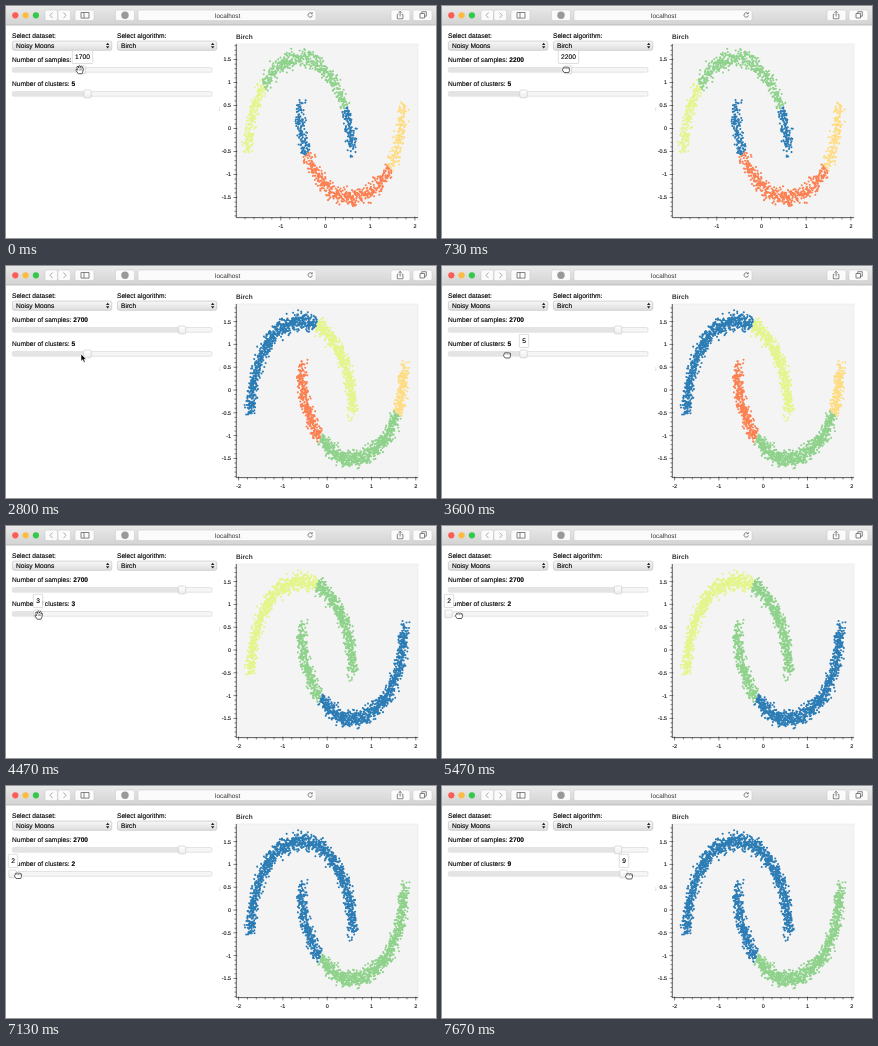
These frames come from a looping animation (430 px wide and 232 px high, 8000 ms). An HTML page:

```html
<!DOCTYPE html>
<html lang="en">
<head>
<meta charset="utf-8">
<title>Clustering demo</title>
<style>
  html, body { margin: 0; width: 100%; height: 100%; overflow: hidden; background: #fff; }
  svg { display: block; width: 430px; height: 232px; }
  text { font: 6.65px "Liberation Sans", Arial, sans-serif; fill: #000; stroke: #000; stroke-width: .12; text-rendering: geometricPrecision; white-space: pre; }
  .bold { font-weight: bold; }
  .tick { font-size: 5.4px; fill: #222; }
  .mid { text-anchor: middle; }
  .end { text-anchor: end; }
  .dots path { fill: none; stroke-width: 2.1; stroke-linecap: round; }
  .icon { fill: none; stroke: #666; stroke-width: .8; }
</style>
</head>
<body>
<svg viewBox="0 0 430 232">
  <defs>
    <linearGradient id="bar" x2="0" y2="1"><stop stop-color="#e9e9e9"/><stop offset="1" stop-color="#d3d3d3"/></linearGradient>
    <linearGradient id="knob" x2="0" y2="1"><stop stop-color="#fff"/><stop offset="1" stop-color="#ededed"/></linearGradient>
    <linearGradient id="menu" x2="0" y2="1"><stop stop-color="#f8f8f8"/><stop offset="1" stop-color="#dedede"/></linearGradient>
  </defs>
  <rect width="430" height="232" fill="#fff"/>
  <rect width="430" height="19" fill="url(#bar)"/>
  <rect y="18.6" width="430" height=".8" fill="#b4b4b4"/>
  <circle cx="9.3" cy="9.3" r="3.1" fill="#fc5b57"/>
  <circle cx="19.6" cy="9.3" r="3.1" fill="#fdbc40"/>
  <circle cx="29.9" cy="9.3" r="3.1" fill="#34c84a"/>
  <g id="buttons" fill="#fbfbfb" stroke="#c6c6c6" stroke-width=".5"></g>
  <path class="icon" d="M46.5 6.5l-2.5 2.8 2.5 2.8M57.5 6.5l2.5 2.8-2.5 2.8" style="stroke:#999"/>
  <path class="icon" d="M75 6.5h8v5.6h-8zM78 6.5v5.6"/>
  <circle cx="119" cy="9.3" r="3.7" fill="#999"/>
  <path class="icon" d="M305.9 7.5a2.2 2.2 0 1 0 .5 1.9M306.3 6.3v1.5h-1.5"/>
  <path class="icon" d="M392.5 8.3h-1.2v4.500h5.600v-4.500h-1.200M394.100 10.500v-5.200m-1.500 1.500l1.500-1.500 1.500 1.500"/>
  <path class="icon" d="M414 7.500h4.500v4.500h-4.500zM415.800 7.500v-1.800h4.500v4.500h-1.800"/>
  <text class="mid" x="221.700" y="11.600" style="font-size:6.400px;fill:#333;stroke:none">localhost</text>
  <g id="selects"></g>
  <g id="sliders"></g>
  <path d="M213.700 101.500v3.500" stroke="#bbb" stroke-width=".7" stroke-dasharray=".8 .6"/>
  <rect x="230" y="38" width="182" height="174" fill="#f4f4f4" stroke="#e4e4e4" stroke-width=".5"/>
  <path d="M230.300 38v173.600h181.700" fill="none" stroke="#222" stroke-width=".7"/>
  <text class="bold" x="230" y="33.300" style="font-size:6.500px;fill:#333;stroke:none">Birch</text>
  <g id="scenes"></g>
  <g id="tips"></g>
  <g id="cursor" stroke-linejoin="round">
    <path id="arrow" d="M0 0v7.200l1.700-1.500 1.200 2.700 1.300-.6-1.200-2.600h2.300z" fill="#000" stroke="#fff" stroke-width=".6"/>
    <g id="open" fill="#fff" stroke="#222" stroke-width=".7">
      <path d="M-1.800 4.200l-2.100-3.200q-.6-1.300.9-.9l.6.500-.9-2.900q.1-1.300 1.300-.5l.6 1.300v-2q.7-1.200 1.400 0l.2 1.700.6-1.500q1-.8 1.300.3l-.2 1.700q1.400-1.400 1.700.2l-.9 3.700-.6 1.600z"/>
      <path d="M-.8-.9l.1 2M.7-1l-.1 2M2-.7l-.3 1.700" fill="none" stroke-width=".45"/>
    </g>
    <g id="closed" fill="#fff" stroke="#222" stroke-width=".7">
      <path d="M-1.900 3l-1.500-2.200q-.5-1.200.7-1.400v-1.300q.7-1 1.600-.2.800-.8 1.700 0 .9-.6 1.500.2 1.400-.4 1.500.9l-.2 2.200-.7 1.800z"/>
      <path d="M-1-1.600v1.200M.7-1.600v1.200M2.200-1.500v1.200" fill="none" stroke-width=".5"/>
    </g>
  </g>
</svg>
<script>
const $ = id => document.getElementById(id);
const rect = (x, y, w, h, r = 1, extra = '') => `<rect x="${x}" y="${y}" width="${w}" height="${h}" rx="${r}" ${extra}/>`;
const text = (x, y, str, cls = '') => `<text x="${x}" y="${y}" class="${cls}">${str}</text>`;

// Browser buttons and form controls
$('buttons').innerHTML = [[39, 12.5], [52, 12.5], [69, 19], [109.5, 19], [132, 178], [385, 19], [407, 19]]
  .map(([x, w]) => rect(x, 4, w, 10.6, 1.8)).join('');

$('selects').innerHTML = [[6, 'Select dataset:', 'Noisy Moons'], [111, 'Select algorithm:', 'Birch']]
  .map(([x, label, value]) => text(x, 32, label) +
    rect(x + .4, 35.1, 99.4, 9.2, 2, 'fill="url(#menu)" stroke="#bdbdbd" stroke-width=".6"') +
    text(x + 4, 42, value) +
    `<path d="M${x + 94} 39l1.700-2.300 1.700 2.300zM${x + 94} 40.300l1.700 2.300 1.700-2.300z" fill="#222"/>`).join('');

const sliders = [['samples', 64, 21], ['clusters', 88, 10]].map(([name, y, tipWidth]) => {
  $('sliders').innerHTML += `<text x="6" y="${y - 8}">Number of ${name}: <tspan class="bold" id="${name}"></tspan></text>` +
    rect(6.3, y - 2.4, 199.6, 4.6, 1.2, 'fill="#f6f6f6" stroke="#d2d2d2" stroke-width=".6"') +
    rect(6.6, y - 2.1, 0, 4, 1, `id="${name}Fill" fill="#e4e4e4"`) +
    rect(-3.7, y - 4, 7.4, 7.8, 1.3, `id="${name}Knob" fill="url(#knob)" stroke="#c4c4c4" stroke-width=".6"`);
  $('tips').innerHTML += `<g id="${name}Tip">` +
    rect(-tipWidth / 2 + .8, y - 19.7, tipWidth - .6, 13.2, .8, 'fill="#fff" stroke="#c8c8c8" stroke-width=".6"') +
    text(.5, y - 11, '', 'mid') + '</g>';
  return (value, x, tipShown) => {
    $(name).textContent = value;
    $(name + 'Fill').setAttribute('width', Math.max(0, x - 6.6));
    $(name + 'Knob').setAttribute('transform', `translate(${x})`);
    const tip = $(name + 'Tip');
    tip.setAttribute('transform', `translate(${x})`);
    tip.style.display = tipShown ? '' : 'none';
    tip.lastChild.textContent = value;
  };
});

// Scatter plots: each moon is cut into clusters by the angle along its arc
const blue = '#2c7cb5', green = '#8fd28b', lime = '#e3f58b', yellow = '#fedc82', orange = '#fb8153';
const small = { n: 1700, x0: 319.5, y0: 122.5, sx: 44.7, sy: 46 };
const large = { n: 2700, x0: 321.2, y0: 124, sx: 44.3, sy: 45.6 };
const scenes = [
  { ...small, moons: [[[46, lime], [152, green], [181, blue]], [[31, blue], [138, orange], [181, yellow]]] },
  { ...large, moons: [[[107, blue], [181, lime]], [[51, orange], [150, green], [181, yellow]]] },
  { ...large, moons: [[[107, lime], [181, green]], [[51, green], [181, blue]]] },
  { ...large, moons: [[[181, blue]], [[51, blue], [181, green]]] }
];

function drawDots({ n, x0, y0, sx, sy, moons }) {
  let seed = 7;
  const random = () => (seed = seed * 16807 % 2147483647) / 2147483647;
  const noise = () => .092 * (random() + random() + random() - 1.5);
  const paths = {};
  for (let i = 0; i < n; i++) {
    const inner = i % 2, a = Math.PI * i / n;
    const c = Math.cos(a) + noise(), s = Math.sin(a) + noise();
    const x = inner ? 1 - c : -c, y = inner ? .5 - s : s;
    const angle = Math.atan2(Math.max(s, 0), c) * 180 / Math.PI;
    const color = moons[inner].find(([limit]) => angle < limit)[1];
    const px = x0 + sx * (x - .5) / .866, py = y0 - sy * (y - .25) / .495;
    paths[color] = (paths[color] || '') + `M${px.toFixed(2)} ${py.toFixed(2)}h0`;
  }
  return '<g class="dots">' + Object.entries(paths).map(([c, d]) => `<path stroke="${c}" d="${d}"/>`).join('') + '</g>';
}

function drawAxes({ x0, y0, sx, sy }) {
  let ticks = '', labels = '';
  for (let i = -19; i <= 18; i++) {
    const y = y0 - i * sy / 10, major = i % 5 === 0;
    ticks += major ? `M227.5 ${y}h3.8` : `M228.5 ${y}h1.8`;
    if (major) labels += text(225, y + 1.9, i / 10, 'tick end');
  }
  for (let i = -10; i <= 10; i++) {
    const x = x0 + i * sx / 5, major = i % 5 === 0;
    if (x < 230.5) continue;
    ticks += major ? `M${x} 210.6v3.8` : `M${x} 211.6v1.8`;
    if (major) labels += text(x, 222, i / 5, 'tick mid');
  }
  return `<path d="${ticks}" stroke="#222" stroke-width=".6"/>` + labels;
}

$('scenes').innerHTML = scenes.map(s => `<g>${drawDots(s)}${drawAxes(s)}</g>`).join('');

// Timeline in steps of 1/15 s: [step, x, y] for the pointer, [step, value] for the rest
const pointer = [[0, 74, 63.5], [5, 74, 63.5], [17, 174, 63.5], [21, 174, 63.5], [22, 172, 62], [34, 172, 62],
  [38, 47, 97], [40, 47, 97], [42, 75, 88], [43, 80, 89], [47, 80, 89], [54, 65, 89], [58, 33, 89],
  [76, 33, 89], [82, 17, 89.5], [85, 17, 89.5], [86, 18, 88], [99, 18, 88], [103, 12, 89.5],
  [108, 12, 89.5], [115, 187, 90], [120, 187, 90]];
const shapes = [[0, 'open'], [1, 'closed'], [21, 'open'], [22, 'arrow'], [43, 'open'], [44, 'closed'], [62, 'open'],
  [76, 'closed'], [85, 'open'], [86, 'arrow'], [103, 'open'], [107, 'closed']];
const plots = [[0, 0], [28, 1], [67, 2], [91, 3]];
const clusterKeys = [[0, 5], [55, 4], [57, 3], [80, 2]];

const held = (keys, step) => keys.filter(k => k[0] <= step).pop()[1];

function pointerAt(step) {
  const i = Math.max(1, pointer.findIndex(k => k[0] >= step));
  const [a, b] = [pointer[i - 1], pointer[i]], p = (step - a[0]) / (b[0] - a[0]);
  return [a[1] + (b[1] - a[1]) * p, a[2] + (b[2] - a[2]) * p];
}

function render(t) {
  const part = t % 200;
  const step = 3 * Math.floor(t / 200) + (part >= 70) + (part >= 130);
  const [x, y] = pointerAt(step), shape = held(shapes, step);
  const samples = step < 21 ? 1700 + 100 * Math.round((x - 74) / 10) : 2700;
  const clusters = step > 108 ? 2 + Math.round((x - 12) / 25) : held(clusterKeys, step);
  const hand = shape !== 'arrow';
  sliders[0](samples, 6 + (samples - 1000) / 10, hand && step < 22);
  sliders[1](clusters, 6.5 + (clusters - 2) * 25, hand && step > 22);
  const plot = held(plots, step);
  [...$('scenes').children].forEach((g, i) => g.style.display = i === plot ? '' : 'none');
  for (const name of ['arrow', 'open', 'closed']) $(name).style.display = name === shape ? '' : 'none';
  $('cursor').setAttribute('transform', `translate(${x} ${y})`);
}

const start = performance.now();
function loop() {
  render((performance.now() - start) % 8000);
  requestAnimationFrame(loop);
}
loop();
</script>
</body>
</html>
```
